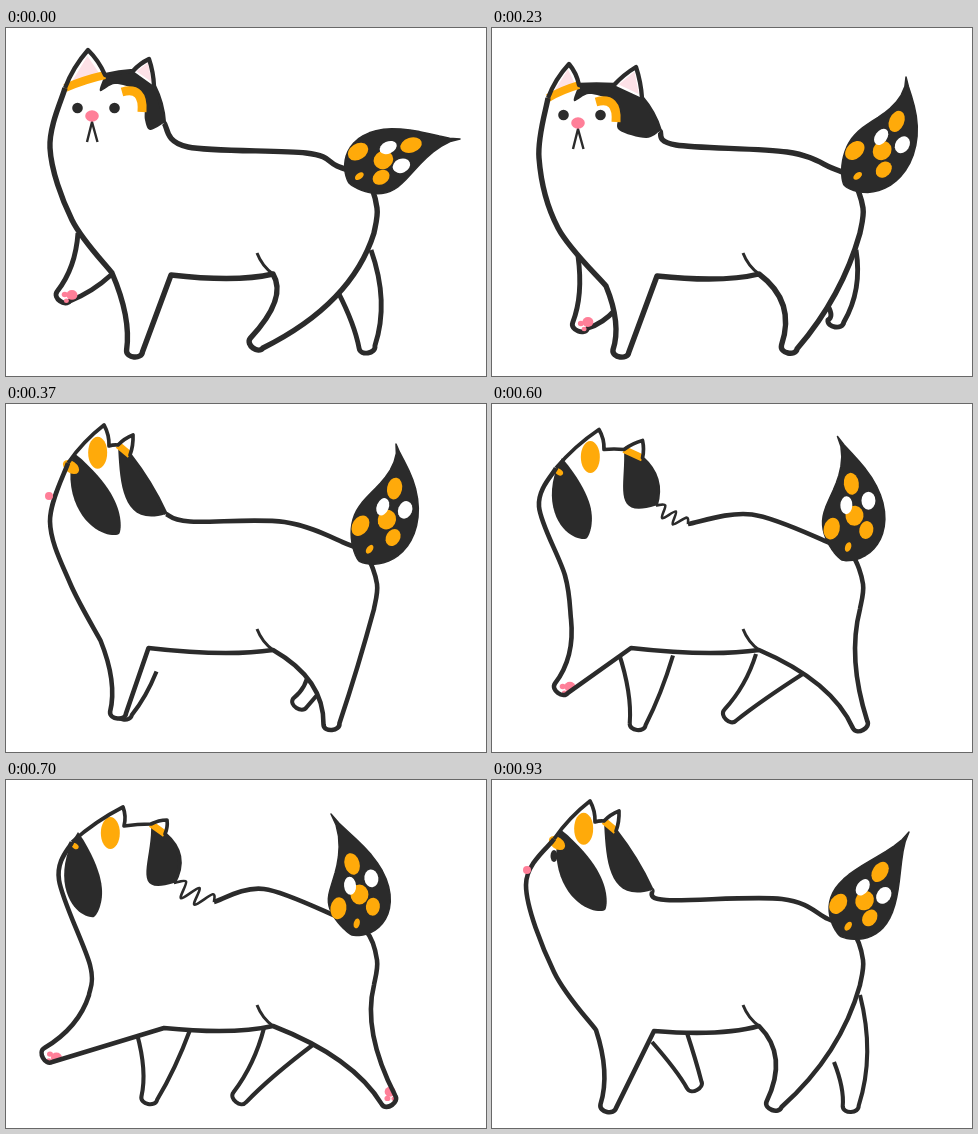
An HTML page for the animation above (1.06 s loop, 480x348 px).

```html
<!DOCTYPE html>
<html lang="en">
<head>
<meta charset="utf-8">
<title>Walking cat</title>
<style>
  html, body { margin: 0; width: 100%; height: 100%; overflow: hidden; background: #fff; }
  svg { display: block; width: 480px; height: 348px; }
</style>
</head>
<body>
<svg id="stage" viewBox="0 0 480 348" stroke-linejoin="round"></svg>
<script>
const INK = '#2b2b2b', ORANGE = '#ffaa0a', PINK = '#ff7f98', EAR = '#fde1e7', WHITE = '#fff';
const LOOP = 1060;
const GROIN = [267, 246], RUMP = [368, 205], HIPS = [[360, 151], [371, 180], RUMP];

const points = text => text.split(',').map(pair => pair.trim().split(' ').map(Number));

// head: left ear (base, tip, base), right ear (base, tip, base), nape
// far legs and fore: front joint, back joint, sole; tail: root, bend, tip
// pads: which soles show (fore, farFore, hind, farHind)
const pose = ({ head, back, chest, fore, farFore, hind, farHind, tail, face, ...rest }) => ({
  front: 0, ruff: 0, cheek: 0, pads: [0, 0, 0, 0], ...rest,
  head: points(head), back: points(back), chest: points(chest), tail: points(tail), face: points(face),
  legs: [fore, farFore, `${GROIN.join(' ')}, ${RUMP.join(' ')}, ${hind}`, farHind].map(points)
});

// face holds the nose, and on a turned head also the lower end of the cheek patch.
const stride = pose({
  front: 1, pads: [0, 1, 0, 0], face: '86 88',
  head: '59 60, 82 22, 99 47, 127 43, 143 31, 148 58, 158 95',
  back: '182 119, 300 125', chest: '66 192, 44 120',
  fore: '106 245, 165 247, 128 329', farFore: '72 205, 105 247, 54 273',
  hind: '247 320', farHind: '332 264, 365 222, 362 325',
  tail: '343 155, 391 115, 454 111'
});
const stand = pose({
  front: 1, pads: [0, 1, 0, 0], face: '86 95',
  head: '56 70, 77 36, 87 57, 122 57, 144 39, 150 70, 168 103',
  back: '184 117, 295 124', chest: '66 200, 47 130',
  fore: '114 258, 165 248, 128 329', farFore: '86 228, 123 282, 86 303',
  hind: '296 325', farHind: '336 278, 364 222, 343 299',
  tail: '352 157, 421 108, 414 49'
});
const lookAway = pose({
  ruff: 4, cheek: 5, pads: [1, 0, 0, 1], face: '45 86, 101 132',
  head: '62 66, 97 24, 106 45, 119 47, 140 33, 142 54, 160 100',
  back: '184 118, 262 112', chest: '62 158, 41 105',
  fore: '75 215, 120 240, 95 300', farFore: '122 242, 178 253, 148 328',
  hind: '356 327', farHind: '270 252, 315 275, 238 309',
  tail: '354 157, 390 82, 366 31'
});
const reach = pose({
  ruff: 9, cheek: 4, pads: [1, 0, 1, 0], face: '50 86, 88 137',
  head: '66 62, 117 27, 118 46, 145 44, 161 40, 159 54, 168 103',
  back: '208 122, 258 109', chest: '84 185, 53 100',
  fore: '83 215, 158 248, 37 278', farFore: '131 254, 184 250, 142 324',
  hind: '386 325', farHind: '258 248, 308 264, 230 322',
  tail: '346 155, 368 96, 325 34'
});
const plant = pose({
  ruff: 12, pads: [0, 0, 1, 1], face: '52 90, 96 136',
  head: '62 70, 93 25, 103 47, 126 43, 136 28, 142 48, 177 105',
  back: '206 127, 258 107', chest: '82 180, 56 100',
  fore: '92 235, 175 251, 104 330', farFore: '162 258, 208 262, 184 328',
  hind: '357 315', farHind: '288 258, 328 280, 293 317',
  tail: '346 147, 356 82, 386 30'
});
const profile = pose({
  cheek: 9, face: '35 90, 113 130',
  head: '62 59, 98 21, 103 42, 112 41, 127 31, 124 51, 160 110',
  back: '174 120, 290 119', chest: '62 192, 34 105',
  fore: '104 250, 162 251, 115 332', farFore: '160 262, 195 253, 205 310',
  hind: '280 330', farHind: '342 282, 368 215, 359 332',
  tail: '348 156, 385 104, 417 52'
});

const add = ([x, y], dx, dy) => [x + dx, y + dy];
const lerp = (a, b, t) => a.map((v, i) => v + (b[i] - v) * t);
const unit = (a, b) => {
  const length = Math.hypot(b[0] - a[0], b[1] - a[1]);
  return [(b[0] - a[0]) / length, (b[1] - a[1]) / length];
};
// Point at given distances along a direction and to its right.
const offset = (p, [dx, dy], along, right) => add(p, dx * along - dy * right, dy * along + dx * right);

// Path pieces; each continues from where the pen is.
const quad = (c, p) => `Q${c} ${p}`;
const cubic = (c, d, p) => `C${c} ${d} ${p}`;
const arc = (a, b, bulge) => quad(offset(lerp(a, b, 0.5), unit(a, b), 0, -bulge), b);
const curve = list => list.slice(1).map((p, i) => {
  const from = list[i], before = list[i - 1] || from, after = list[i + 2] || p;
  return cubic(from.map((v, j) => v + (p[j] - before[j]) / 6), p.map((v, j) => v - (after[j] - from[j]) / 6), p);
}).join('');

const shape = (d, fill, stroke = 'none', width = 0) =>
  `<path d="${d}" fill="${fill}" stroke="${stroke}" stroke-width="${width}"/>`;
const line = (d, width, color = INK) => shape(d, 'none', color, width);
const oval = ([x, y], rx, ry, fill, turn = 0) =>
  `<ellipse rx="${rx}" ry="${ry}" fill="${fill}" transform="translate(${x} ${y}) rotate(${turn})"/>`;

// How far the front and back edge of each leg bow, given the sole's x.
const bows = [
  () => [12, 6, 0, 0],
  () => [8, 6, 2, 4],
  x => [26, -8, (330 - x) * 0.4, (330 - x) * 0.16],
  x => [6, 4, (x - 280) * 0.2, 4]
];
const legAxis = ([a, b, sole]) => unit(lerp(a, b, 0.5), sole);

// Down the back edge, round the paw and up the front edge.
function leg(joints, index) {
  const [a, b, sole] = joints, axis = legAxis(joints);
  const [ax, ay, bx, by] = bows[index](sole[0]);
  const heel = offset(sole, axis, -6, -8), toe = offset(sole, axis, -6, 8);
  return quad(add(lerp(b, heel, 0.5), bx, by), heel) +
    cubic(offset(heel, axis, 8, 0), offset(toe, axis, 8, 0), toe) +
    quad(add(lerp(a, toe, 0.5), ax, ay), a);
}

const pads = joints => [[12, 6, 5.5], [8, 0, 3], [4, 5, 2.5]].map(([up, side, r]) =>
  oval(offset(joints[2], legAxis(joints), -up, -side), r, r * 0.9, PINK)).join('');

const along = ([a, b, c], t) => lerp(lerp(a, b, t), lerp(b, c, t), t);
const heading = ([a, b, c], t) => unit(lerp(a, b, t), lerp(b, c, t));

// Teardrop around a bent axis, round at the start and tapering to the end.
function drop(axis, width, taper) {
  const round = 0.7, peak = round / (round + taper);
  const swell = t => t ** round * (1 - t) ** taper;
  const edge = side => Array.from({ length: 25 }, (_, i) => {
    const t = (i / 24) ** 2;
    return offset(along(axis, t), heading(axis, t), 0, side * width * swell(t) / swell(peak));
  });
  return 'M' + [...edge(-1), ...edge(1).reverse()].join('L') + 'Z';
}

// Place along the tail, distance to its right, radii, colour.
const spots = [
  [0.2, -20, 8, 11, ORANGE], [0.34, 0, 9, 10, ORANGE], [0.6, -3, 7.5, 11, ORANGE], [0.25, 14, 7, 9, ORANGE],
  [0.1, 1, 3, 5, ORANGE], [0.42, -9, 6, 9, WHITE], [0.46, 13, 7, 9, WHITE]
];
const drawTail = axis => shape(drop(axis, 31, 1.7), INK, INK, 1.5) +
  spots.map(([t, side, rx, ry, fill]) => {
    const dir = heading(axis, t);
    return oval(offset(along(axis, t), dir, 0, side), rx, ry, fill, Math.atan2(dir[1], dir[0]) * 180 / Math.PI + 90);
  }).join('');

function frontFace({ head, face: [nose] }, skull) {
  const [base, tip, inner, crown, tip2, base2, nape] = head;
  const from = (x, y) => add(inner, x, y);
  const pink = ear => {
    const centre = [0, 1].map(j => (ear[0][j] + ear[1][j] + ear[2][j]) / 3);
    return shape('M' + ear.map(p => lerp(centre, p, 0.72)).join('L') + 'Z', EAR);
  };
  const fringe = [nape, add(nape, -14, 7), from(40, 45), from(39, 30), from(30, 15), from(10, 9), from(-5, 16), inner];
  const mouth = add(nose, 0, 6);
  return shape(`M${inner}L${crown}L${base2}${skull}${curve(fringe)}Z`, INK) +
    pink([base, tip, inner]) + pink([crown, tip2, base2]) +
    line(`M${base}${arc(base, inner, 2)}`, 8, ORANGE) +
    line(`M${from(17, 17)}${quad(from(39, 11), from(37, 37))}`, 9, ORANGE) +
    oval(add(nose, -14.5, -8), 5.3, 5.3, INK) + oval(add(nose, 22.5, -8), 5.3, 5.3, INK) +
    line(`M${add(mouth, -5, 20)}L${mouth}L${add(mouth, 5.5, 20)}`, 2.4) + oval(nose, 6.8, 5.7, PINK);
}

function turnedFace({ head, cheek, face: [nose, jowl] }, skull) {
  const [base, tip, inner, crown, , base2, nape] = head;
  const top = add(base, 6, -10);
  const centre = [0, 1].map(j => (base[j] + tip[j] + inner[j]) / 3);
  return shape(drop([jowl, add(lerp(jowl, top, 0.5), -8, 8), top], 18, 0.9), INK) +
    shape(`M${crown}L${base2}${skull}${cubic(add(nape, -45, 14), add(crown, 2, 36), crown)}`, INK) +
    oval(add(centre, 4, 8), 9.5, 16, ORANGE) +
    line(`M${crown}L${base2}`, 7, ORANGE) +
    oval(add(base, 3, 4), cheek, cheek * 0.65, ORANGE, 35);
}

function draw(cat) {
  const { front, ruff, head, back, chest, legs, tail } = cat;
  const [fore, , hind] = legs, nape = head[6];
  const width = front ? 5.4 : 4.6;
  const limbs = legs.map(leg);
  const paw = i => cat.pads[i] === 1 ? pads(legs[i]) : '';
  const farLeg = i => shape(`M${legs[i][1]}${limbs[i]}`, WHITE, INK, width - 0.5) + paw(i);

  const skull = arc(head[5], nape, 4 + ruff * 1.8);
  const ears = [4, 3, 1, 2, 2].map((bulge, i) => arc(head[i], head[i + 1], bulge)).join('');
  const spine = [...back, add(tail[0], -12, -17), ...HIPS];
  const belly = quad(add(lerp(hind[0], fore[1], 0.5), 15, 8), fore[1]);
  const under = limbs[2] + belly + limbs[0] + curve([fore[0], ...chest, head[0]]);
  const trunk = ruff ? `M${spine[0]}${curve(spine)}` : `M${nape}${curve([nape, ...spine])}`;

  // Skin folds zigzag between the tucked head and the back.
  const folds = Array.from({ length: 7 }, (_, i) => {
    const amp = i % 6 ? ruff : 0;
    return add(lerp(nape, back[0], i / 6), amp * (i % 2 ? 0.6 : -0.7), amp * (i % 2 ? -0.5 : 1));
  });

  return [
    farLeg(1), farLeg(3),
    shape(`M${head[0]}${ears}${skull}${curve([nape, ...spine])}${under}`, WHITE),
    front ? frontFace(cat, skull) : turnedFace(cat, skull),
    paw(0), paw(2),
    line(trunk + under, width),
    line(`M${head[0]}${ears}${skull}`, width * 0.8),
    line(`M251 225${quad([256, 238], GROIN)}`, 3),
    ruff ? line(`M${folds[0]}${curve(folds)}`, 2.6) : '',
    cat === turning || cat === profile ? profileFace(cat.face[0]) : '',
    drawTail(tail)
  ].join('');
}

const profileFace = nose => oval(add(nose, 27, -14), 3.5, 6, INK) + oval(nose, 4, 4, PINK);

const halfway = (a, b) =>
  typeof a === 'number' ? (a + b) / 2 :
  Array.isArray(a) ? a.map((v, i) => halfway(v, b[i] ?? v)) :
  Object.fromEntries(Object.keys(a).map(key => [key, halfway(a[key], b[key])]));

const { head, face, cheek } = profile;
const turning = {
  ...halfway(stand, lookAway), front: 0, ruff: 0, head, cheek,
  face: [add(face[0], 8, 2), face[1]]
};

const timeline = [
  [0, stride], [130, halfway(stride, stand)], [230, stand], [370, turning], [470, lookAway],
  [600, halfway(lookAway, reach)], [700, reach], [830, plant], [930, profile]
].map(([start, cat]) => ({ start, markup: draw(cat) }));

const stage = document.getElementById('stage');
let shown, origin;

function render(now) {
  origin ??= now;
  const time = (now - origin) % LOOP;
  const current = timeline.findLast(step => step.start <= time) || timeline[0];
  if (current !== shown) stage.innerHTML = (shown = current).markup;
  requestAnimationFrame(render);
}
requestAnimationFrame(render);
</script>
</body>
</html>
```
